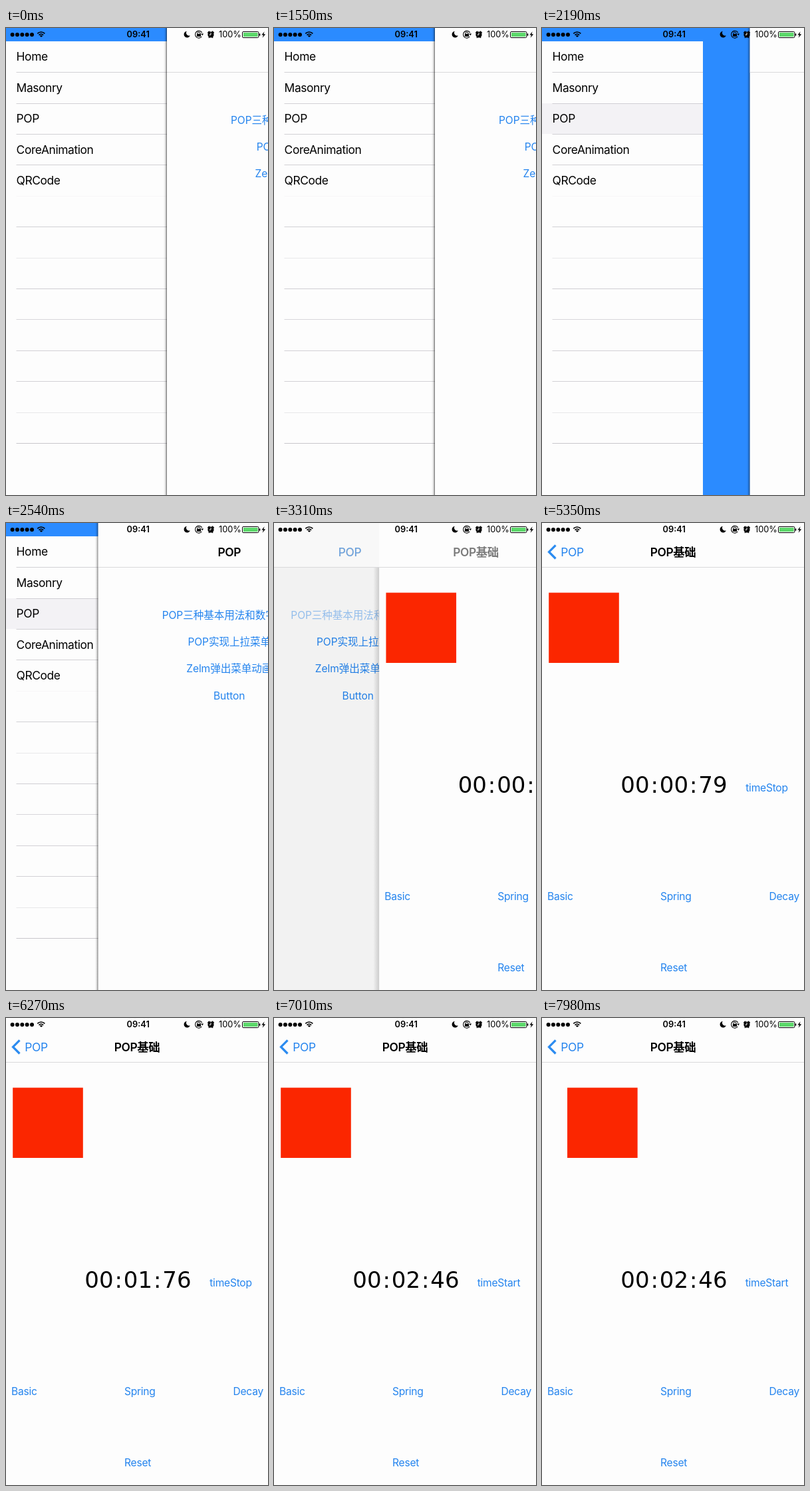
These frames come from a looping animation (394x701 px, 8000 ms). An HTML page:

```html
<!DOCTYPE html>
<html lang="zh-CN">
<head>
<meta charset="utf-8">
<title>POP</title>
<style>
  html, body { margin: 0; width: 100%; height: 100%; overflow: hidden; background: #fdfdfd; }
  svg { display: block; width: 394px; height: 701px; }
  text { font: 400 15.6px Inter, "Noto Sans CJK SC", sans-serif; letter-spacing: -.25px; white-space: pre; }
  .row, .bar { font-size: 17.4px; letter-spacing: -.4px; }
  .title { font-weight: 600; }
  .mid { text-anchor: middle; }
  .link { fill: #2484ee; }
  .menu { letter-spacing: -.1px; }
  .timer { font: 34px "DejaVu Sans", sans-serif; letter-spacing: 0; }
  .status { font-size: 12.8px; letter-spacing: 0; }
</style>
</head>
<body>
<svg viewBox="0 0 394 701">
  <defs>
    <linearGradient id="edge">
      <stop offset="0" stop-opacity="0"/>
      <stop offset=".5" stop-opacity=".1"/>
      <stop offset="1" stop-opacity=".55"/>
    </linearGradient>
    <linearGradient id="soft">
      <stop offset="0" stop-opacity="0"/>
      <stop offset="1" stop-opacity=".16"/>
    </linearGradient>
  </defs>

  <rect width="394" height="701" fill="#2b8bff"/>

  <g id="drawer">
    <rect y="20" width="242" height="681" fill="#fdfdfd"/>
    <rect id="chosen" y="113" width="242" height="46" fill="#f3f2f5"/>
  </g>

  <g id="center">
    <rect x="-5" width="5" height="701" fill="url(#edge)"/>
    <rect width="394" height="701" fill="#fdfdfd"/>
    <g id="list"></g>
    <rect id="dim" width="394" height="701"/>
    <g id="page">
      <rect x="-9" y="66" width="9" height="635" fill="url(#soft)"/>
      <rect width="394" height="701" fill="#fdfdfd"/>
      <rect id="box" x="10.2" y="104.6" width="105.6" height="105.4" fill="#fb2600"/>
      <g id="clock"></g>
    </g>
    <rect width="394" height="66" fill="#fdfdfd" fill-opacity=".6"/>
    <rect y="66" width="394" height="1" fill="#d9d9db"/>
    <polyline id="chevron" points="20.5,33.3 10.5,43.4 20.5,53.5" fill="none" stroke="#2b8bf0" stroke-width="3.2"/>
    <text id="oldTitle" class="bar title mid" y="49.8">POP</text>
    <text id="back" class="bar link mid" y="49.8">POP</text>
    <text id="newTitle" class="bar title mid" y="49.8">POP基础</text>
  </g>

  <g id="status">
    <text class="status title mid" x="198.7" y="14.4">09:41</text>
    <rect x="288" y="6" width="4" height="5" rx="2" fill="none" stroke="#000"/>
    <rect x="287" y="8.8" width="6" height="4"/>
    <polygon points="293.2,8.4 297.2,8.4 295.2,11.2"/>
    <circle cx="308" cy="10" r="4.6"/>
    <g stroke="#000" stroke-width="1.6">
      <line x1="303.4" y1="7.6" x2="306" y2="4.9"/>
      <line x1="312.6" y1="7.6" x2="310" y2="4.9"/>
      <line x1="305" y1="14.8" x2="306" y2="13.4"/>
      <line x1="311" y1="14.8" x2="310" y2="13.4"/>
    </g>
    <polyline points="308,7 308,10.2 305.6,10.2" fill="none" stroke="#fff"/>
    <text class="status" x="320" y="14.4">100%</text>
    <rect x="355.5" y="5.5" width="24.4" height="9" rx="1.4" fill="none" stroke="#000"/>
    <rect x="357" y="7" width="21.4" height="6" fill="#5cd86a"/>
    <rect x="380.6" y="8.2" width="1.7" height="3.6" rx=".8"/>
    <polygon points="388.6,5.2 384.4,10.6 387,10.6 385.6,14.8 390.2,9.2 387.4,9.2"/>
  </g>
</svg>

<script>
const LOOP = 8000, WIDTH = 394, DRAWER = 242, RAD = Math.PI / 180;
const $ = id => document.getElementById(id);

function add(parent, tag, attrs, text = '') {
  const el = document.createElementNS('http://www.w3.org/2000/svg', tag);
  for (const key in attrs) el.setAttribute(key, attrs[key]);
  el.textContent = text;
  return $(parent).appendChild(el);
}
const label = (parent, cls, x, y, text) => add(parent, 'text', { class: cls, x, y }, text);
const shift = (id, x) => $(id).setAttribute('transform', `translate(${x} 0)`);
const show = (id, opacity) => $(id).setAttribute('opacity', opacity);

// Stroked arc, angles in degrees clockwise from the right.
function arc(cx, cy, r, from, sweep, width) {
  add('status', 'circle', {
    cx, cy, r, fill: 'none', stroke: '#000', 'stroke-width': width,
    'stroke-dasharray': `${r * sweep * RAD} ${r * 7}`, transform: `rotate(${from} ${cx} ${cy})`
  });
}
const arcPoints = (cx, cy, r, from, to) => Array.from({ length: 25 }, (_, i) => {
  const a = (from + (to - from) * i / 24) * RAD;
  return [cx + r * Math.cos(a), cy + r * Math.sin(a)];
});

['Home', 'Masonry', 'POP', 'CoreAnimation', 'QRCode'].forEach((name, i) =>
  label('drawer', 'row', 15.6, 49.4 + 46.4 * i, name));
[.8, .8, .8, .8, .12, .8, .4, .85, .7, .8, .8, .4, 1].forEach((opacity, i) =>
  add('drawer', 'rect', { x: 15.5, y: Math.round(66.1 + 46.42 * i), width: 226.5, height: 1, fill: '#c8c7cc', opacity }));

const links = ['POP三种基本用法和数字动画', 'POP实现上拉菜单', 'Zelm弹出菜单动画', 'Button']
  .map((name, i) => label('list', 'link menu mid', 197, 144.2 + 40.1 * i, name));

for (const [x, y, name] of [[8, 565.6, 'Basic'], [178, 565.6, 'Spring'], [341.5, 565.6, 'Decay'], [178, 673.2, 'Reset']])
  label('page', 'link', x, y, name);
const toggle = label('page', 'link mid', 338, 403, '');

const pairs = [0, 1, 2].map(i => label('clock', 'timer mid', 140 + 58.5 * i, 405.4, '00'));
[0, 1].forEach(i => label('clock', 'timer mid', 169.2 + 58.5 * i, 405.4, ':'));

// Signal dots, wireless fan, moon and lock ring.
for (let i = 0; i < 5; i++) add('status', 'circle', { cx: 9.6 + 7.35 * i, cy: 10, r: 3 });
[[1.4, 2.8], [4.6, 1.7], [7.8, 1.7]].forEach(([r, width]) => arc(52.8, 13.8, r, -135, 90, width));
add('status', 'polygon', {
  points: [...arcPoints(272.4, 9.6, 4.8, 21.3, 261.3), ...arcPoints(275.4, 7.2, 4.4, 212.2, 70.4)].join(' ')
});
arc(290, 9.7, 5.4, 35, 290, 1.1);

const phase = (t, from, to) => Math.min(1, Math.max(0, (t - from) / (to - from)));
const ease = u => u * u * (3 - 2 * u);

function centerX(t) {
  if (t < 2280) return DRAWER + (WIDTH - DRAWER) * ease(phase(t, 2110, 2280));
  return WIDTH * (1 - ease(phase(t, 2280, 2715)));
}

// Critically damped push, settled by 3830 ms.
function pushed(t) {
  if (t >= 3830) return 1;
  const s = Math.max(0, t - 3167) * .014;
  return 1 - Math.exp(-s) * (1 + s);
}

const ticks = [[4560, 0], [5350, 79.4], [6270, 176.4], [7010, 246.4]];
function hundredths(t) {
  let value = 0;
  for (let i = 1; i < ticks.length; i++) {
    const [t0, v0] = ticks[i - 1], [t1, v1] = ticks[i];
    value += (v1 - v0) * phase(t, t0, t1);
  }
  return Math.floor(value);
}

function draw(t) {
  show('chosen', t >= 1960 ? 1 : 0);
  shift('center', centerX(t));

  const p = pushed(t), rest = 1 - p, backX = 197 - 151.5 * p ** 1.17;
  shift('list', -.3 * WIDTH * p);
  show('dim', .075 * p);
  shift('page', p ? WIDTH * rest : WIDTH + 10);
  links[0].setAttribute('opacity', t >= 3010 ? .45 : 1);

  shift('oldTitle', backX);
  shift('back', backX);
  shift('newTitle', 197 + 265 * rest);
  show('oldTitle', rest * rest);
  show('back', p);
  show('newTitle', p ** 1.3);
  show('chevron', phase(p, .6, 1));

  const n = hundredths(t);
  [Math.floor(n / 6000), Math.floor(n / 100) % 60, n % 100].forEach((v, i) =>
    pairs[i].textContent = String(v).padStart(2, '0'));
  toggle.textContent = t >= 4560 && t < 7010 ? 'timeStop' : 'timeStart';

  shift('box', 27.4 * phase(t, 7880, 7980) ** 1.7 + Math.max(0, t - 7980) * .46);
}

const start = performance.now();
function frame() {
  draw((performance.now() - start) % LOOP);
  requestAnimationFrame(frame);
}
draw(0);
requestAnimationFrame(frame);
</script>
</body>
</html>
```
